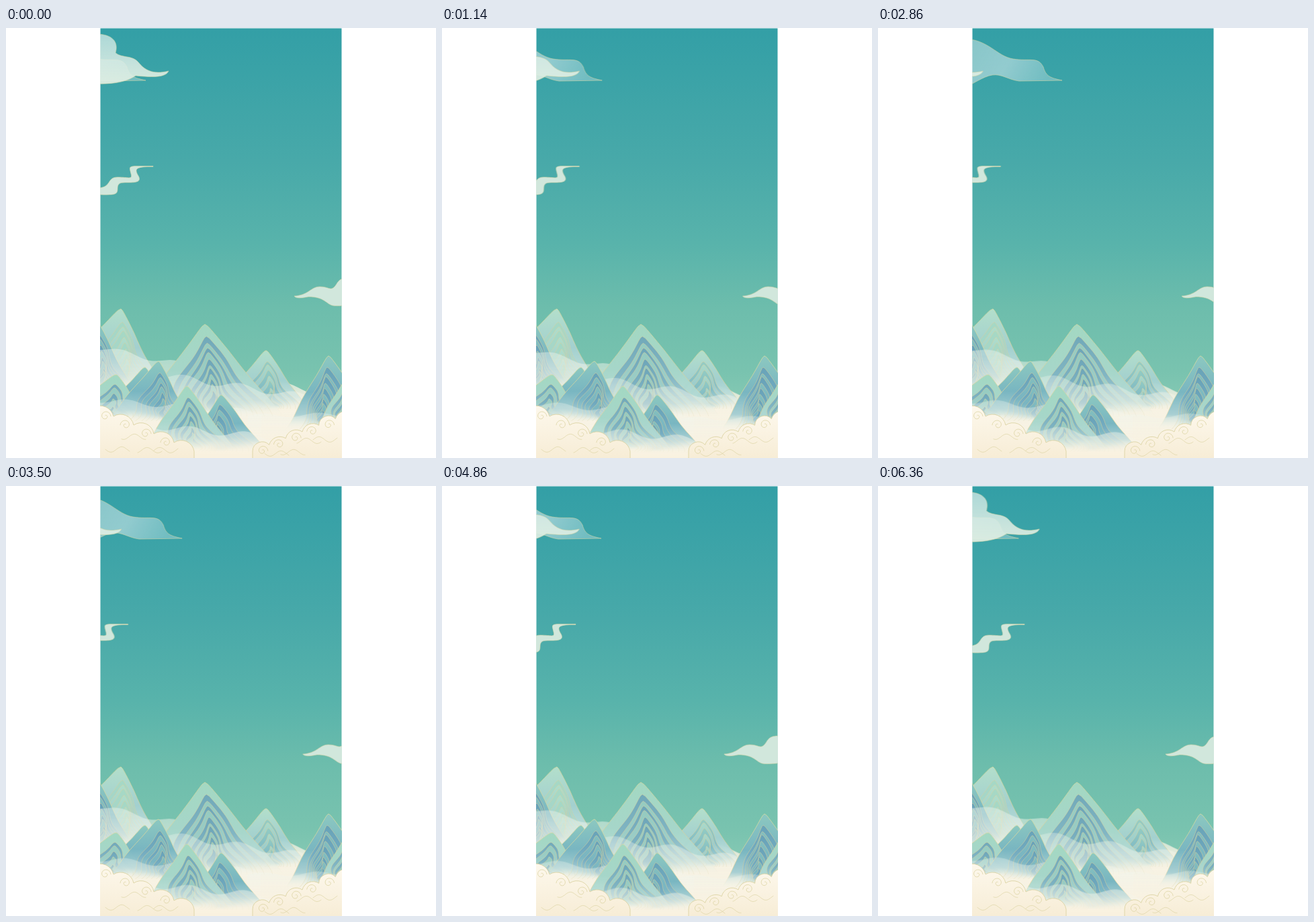
An HTML page for the animation above (6.43 s loop, 640 px wide and 640 px high).

```html
<!DOCTYPE html>
<html lang="en">
<head>
<meta charset="utf-8">
<title>Mountains in drifting clouds</title>
<style>
  html, body { margin: 0; width: 100%; height: 100%; overflow: hidden; background: #fff; }
  svg { display: block; width: 100vw; height: 100vh; }
  .drift { animation: 6430ms -20ms infinite; stroke: #d3d6a8; stroke-width: .6; }
  #backCloud { animation-name: back; fill: url(#veil); }
  #frontCloud { animation-name: front; fill: url(#milk); }
  #wisp { animation-name: wisp; fill: #d1e7dc; }
  #rightCloud { animation-name: right; fill: #d1e7dc; }
  .mist { animation: mist 3215ms -20ms infinite; }

  /* Each leg runs at constant speed, one step per picture, 90 pictures a loop. */
  @keyframes back {
    0% { transform: none; animation-timing-function: steps(37); }
    41.1111% { transform: translateX(70px); animation-timing-function: steps(53); }
    100% { transform: none; }
  }
  @keyframes front {
    0% { transform: none; animation-timing-function: steps(38); }
    42.2222% { transform: translateX(-89px); animation-timing-function: steps(52); }
    100% { transform: none; }
  }
  @keyframes wisp {
    0%, 100% { transform: none; animation-timing-function: steps(45); }
    50% { transform: translateX(-41px); animation-timing-function: steps(45); }
  }
  @keyframes right {
    0% { transform: none; animation-timing-function: steps(30); }
    33.3333% { transform: translateX(34.5px); animation-timing-function: steps(45); }
    83.3333% { transform: translateX(-17.25px); animation-timing-function: steps(15); }
    100% { transform: none; }
  }
  @keyframes mist {
    0% { transform: none; animation-timing-function: steps(20); }
    44.4444% { transform: translate(-6px, 6px); animation-timing-function: steps(25); }
    100% { transform: none; }
  }
</style>
</head>
<body>
<svg viewBox="0 0 640 640">
  <defs id="defs">
    <clipPath id="panel"><rect x="140.5" y=".5" width="359" height="640"/></clipPath>
    <linearGradient id="sky" x2="0" y2="1">
      <stop offset="0" stop-color="#339fa6"/>
      <stop offset=".31" stop-color="#48a9a9"/>
      <stop offset=".5" stop-color="#58b3ab"/>
      <stop offset=".65" stop-color="#6dbdac"/>
      <stop offset=".8" stop-color="#79c3af"/>
      <stop offset="1" stop-color="#9dd4bd"/>
    </linearGradient>
    <linearGradient id="veil" x2="1" y2=".3">
      <stop offset="0" stop-color="#d8ebea" stop-opacity=".5"/>
      <stop offset=".55" stop-color="#cfe7ea" stop-opacity=".6"/>
      <stop offset="1" stop-color="#a9d8dc" stop-opacity=".5"/>
    </linearGradient>
    <linearGradient id="milk" x2="0" y2="1">
      <stop offset="0" stop-color="#dceeea" stop-opacity=".72"/>
      <stop offset="1" stop-color="#e0eee2" stop-opacity=".94"/>
    </linearGradient>
    <linearGradient id="cream" x2="0" y2="1">
      <stop offset="0" stop-color="#fdf8ec"/>
      <stop offset="1" stop-color="#f6ebd3"/>
    </linearGradient>
  </defs>
  <g clip-path="url(#panel)">
    <rect x="140" width="360" height="640" fill="url(#sky)"/>
    <path id="backCloud" class="drift" d="M60,16C98,16 110,42 135,46S172,42 180,58C184,72 190,74 208,78L144,79C128,77 118,68 104,70S75,84 60,90Z"/>
    <path id="frontCloud" class="drift" d="M130,9C158,8 168,20 163,37C172,45 188,40 197,51S218,70 242,64C238,73 222,74 193,71C180,80 160,84 130,83Z"/>
    <path id="wisp" class="drift" d="M130,238C160,240 148,222 166,222S188,226 186,217S182,206 193,205.5H219V206.5C190,206 192,211 197,220S194,230 182,230S166,230 166,240S158,248 130,248Z"/>
    <path id="rightCloud" class="drift" d="M429,399C450,398 454,385 467,385S482,391 488,386S493,372 509,372S520,364 540,360V412C516,411 495,415 486,413S474,400 450,400Q432,404 429,399Z"/>
    <g id="scene"></g>
  </g>
</svg>
<script>
const svgNS = 'http://www.w3.org/2000/svg';
const defs = document.getElementById('defs');
const scene = document.getElementById('scene');
const GOLD = '#d9d09c';
let serial = 0;
let seed = 11;

const random = () => (seed = seed * 16807 % 2147483647) / 2147483647;
const lerp = (a, b, t) => a + (b - a) * t;

function add(parent, tag, attrs) {
  const node = document.createElementNS(svgNS, tag);
  for (const key in attrs) node.setAttribute(key, attrs[key]);
  return parent.appendChild(node);
}

function gradient(stops, attrs) {
  const id = 'g' + serial++;
  const node = add(defs, 'linearGradient', { id, x2: 0, y2: 1, ...attrs });
  for (const [offset, color, opacity] of stops)
    add(node, 'stop', { offset, 'stop-color': color, 'stop-opacity': opacity });
  return `url(#${id})`;
}

// Path through count + 1 points given by a function of 0..1.
function trace(point, count = 24) {
  const points = Array.from({ length: count + 1 }, (_, i) => point(i / count).map(v => v.toFixed(1)));
  return 'M' + points.join('L');
}

const gold = (d, width = .7) =>
  add(scene, 'path', { d, fill: 'none', stroke: GOLD, 'stroke-width': width, 'stroke-linecap': 'round' });

// Two slopes from a rounded tip; left and right are widths per unit of height.
function ridge(x, y, height, left, right, sway) {
  const leg = (side, down) =>
    [x + side * down * height + Math.sin(down * 9) * sway * down, y + down * height];
  return trace(t => {
    const u = 2 * t - 1;
    const [px, py] = leg(u < 0 ? -left : right, Math.abs(u));
    return [px, py + 3 * Math.exp(-Math.abs(u) * height / 3)];
  }, 48);
}

const fade = (top, mid, low) => gradient([[0, top, 1], [.5, mid, 1], [.8, low, .9], [1, '#eaf0e2', 0]]);
const MINT = fade('#a3d8c2', '#a6d6c9', '#b5dbd6');
const PALE = fade('#b3dfcb', '#a3d0cf', '#bfdedb');
const TEAL = fade('#8cc8c0', '#79b6c1', '#9fcbd0');
const BLUE = fade('#5d97b5', '#72a9c0', '#a0c9d1');

// Nested folds alternate dark and light and lean towards the right slope.
function mountain(x, y, height, left, right, light = MINT, dark = BLUE, lean = 1) {
  const id = 'm' + serial++;
  const outline = ridge(x, y, height, left, right, 2);
  add(add(defs, 'clipPath', { id }), 'path', { d: outline });
  const group = add(scene, 'g', { 'clip-path': `url(#${id})` });
  add(group, 'path', { d: outline, fill: light });
  const folds = Math.round(height / 13);
  for (let i = 1; i <= folds; i++) {
    const t = i / folds, drop = height * (.1 + .62 * t) - 4 * random();
    add(group, 'path', {
      d: ridge(x + lean * drop * .12, y + drop, height - drop, left * (.85 - .5 * t), right * (1 - .6 * t), 5 + 3 * random()),
      fill: i % 2 ? dark : light, 'fill-opacity': .72,
      stroke: GOLD, 'stroke-width': .7, 'stroke-opacity': .75
    });
  }
  add(scene, 'path', {
    d: outline, fill: 'none', 'stroke-width': .9,
    stroke: gradient([[0, '#cdd9a6', 1], [.7, GOLD, .8], [1, GOLD, 0]])
  });
}

// Haze below a wavy edge, thickening into cream.
function mist(x0, x1, y0, y1, wave, phase, depth, strength = .4) {
  const edge = trace(t => {
    const x = lerp(x0, x1, t);
    return [x, lerp(y0, y1, t) + wave * Math.sin((x - phase) / 13)];
  }, 60);
  const top = Math.min(y0, y1) - wave;
  add(scene, 'path', {
    class: 'mist', d: `${edge}V650H${x0}Z`,
    fill: gradient([[0, '#eef6f1', strength], [.5, '#f5f4e9', strength + .15], [1, '#f9f1df', 1]],
      { gradientUnits: 'userSpaceOnUse', x1: 0, x2: 0, y1: top, y2: top + depth })
  });
}

// Far range
mountain(171, 415, 118, .97, .5, PALE, MINT);
mountain(137, 436, 105, .6, .5, TEAL, BLUE);
mist(130, 510, 474, 551, 4, 192, 92);
mountain(387, 477, 90, .82, .68, PALE, TEAL);
mountain(296, 438, 140, .74, .83, MINT, BLUE);
mist(225, 510, 515, 558, 5, 287, 92, .32);

// Middle range
mountain(480, 485, 112, .57, .7, TEAL, BLUE, -1);
mountain(506, 520, 75, .6, .5, MINT, BLUE, -1);
mountain(207, 502, 75, .9, .55, TEAL, BLUE);
mountain(164, 513, 66, 1.3, .7, MINT, BLUE, -1);
mountain(227, 493, 92, .85, .52, TEAL, BLUE);
mist(130, 380, 553, 572, 4, 200, 62, .3);
mist(360, 510, 577, 575, 3, 403, 45, .3);

// Near range
mountain(320, 543, 88, .62, .77, TEAL, BLUE, -1);
mountain(269, 530, 98, .68, .72, MINT, BLUE);
mist(205, 415, 591, 611, 5, 295, 48, .35);

// Billows along a line, each bump a little irregular.
function bank(x0, y0, x1, y1, bumps) {
  let d = `M${x0},650V${y0}`;
  for (let i = 1; i <= bumps; i++) {
    const t = i / bumps, r = Math.hypot(x1 - x0, y1 - y0) / bumps * (.54 + .12 * random());
    d += `A${r},${r} 0 0 1 ${lerp(x0, x1, t)},${lerp(y0, y1, t)}`;
  }
  add(scene, 'path', { d: d + 'V650Z', fill: 'url(#cream)', stroke: GOLD, 'stroke-width': .8 });

  // Gold curls under the edge and flowing strands below them.
  for (let i = 0; i < bumps - 1; i++) {
    const t = (i + .6) / bumps, side = i % 2 ? -1 : 1;
    const x = lerp(x0, x1, t), y = lerp(y0, y1, t) + 5;
    gold(trace(u => {
      const radius = 8 * (1 - .85 * u);
      return [x + side * radius * Math.cos(u * 8), y - radius * Math.sin(u * 8)];
    }));
  }
  const left = Math.min(x0, x1), low = Math.max(y0, y1);
  for (let i = 0; i < 4; i++) {
    const x = left + 18 + 24 * i, y = low - 22 + 26 * random();
    gold(trace(u => [x + 36 * u, y + 4 * Math.sin(u * 7 + i)]), .6);
  }
}

bank(130, 565, 280, 630, 5);
bank(367, 630, 515, 572, 6);
</script>
</body>
</html>
```
